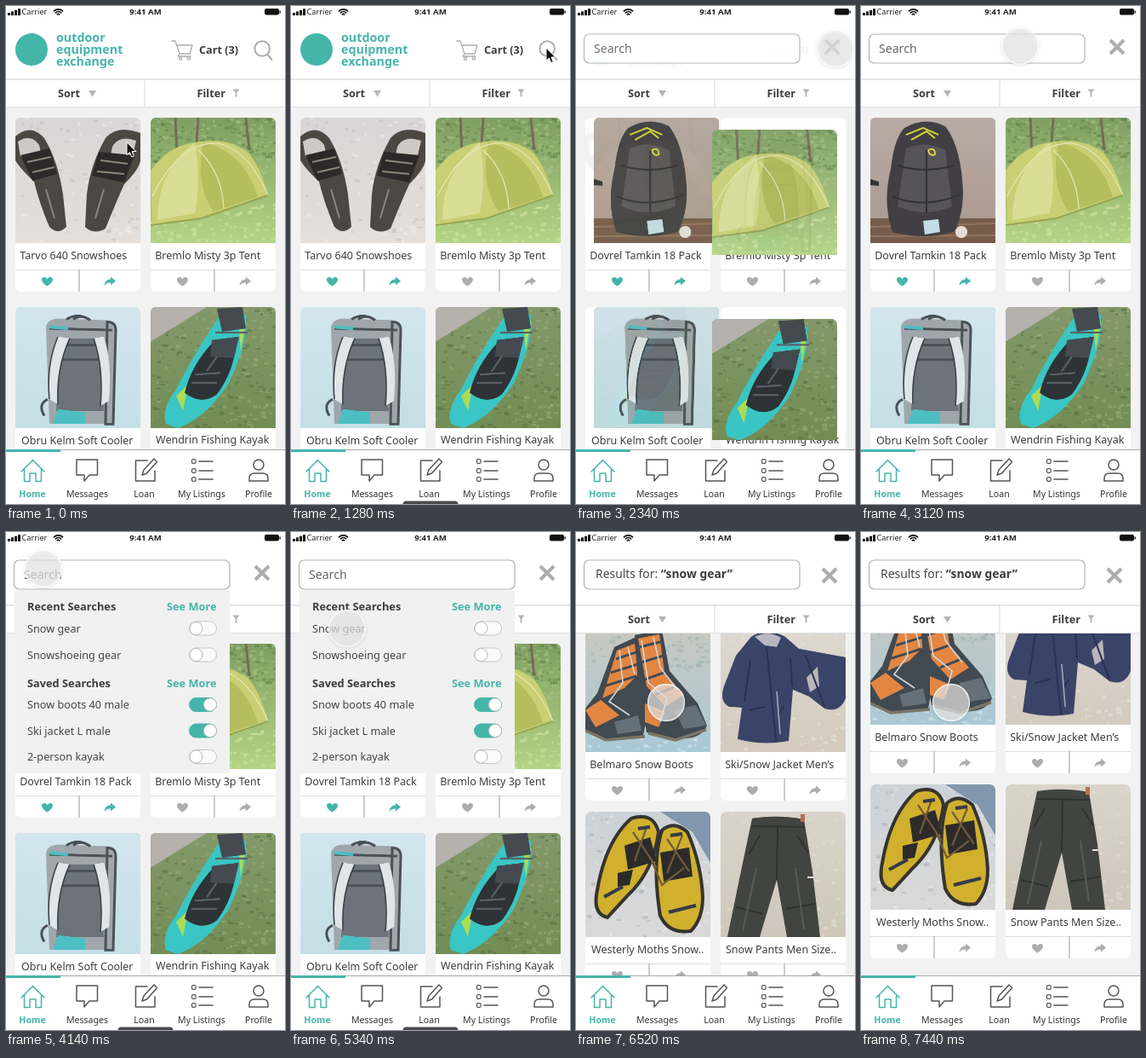
Write an HTML page with a canvas that moves like this. It is 328x584 px and loops after 7460 ms.

```html
<!DOCTYPE html>
<html lang="en">
<head>
<meta charset="utf-8">
<title>Gear exchange app</title>
<style>
html, body { margin: 0; width: 100%; height: 100%; overflow: hidden; background: #fff; }
canvas { display: block; width: 328px; height: 584px; }
</style>
</head>
<body>
<canvas id="stage"></canvas>
<script>
const LOOP = 7460, W = 328, H = 584, SIZE = 147;
const TEAL = '#45b5aa', INK = '#3c3c3c', GRAY = '#adadad', PAGE = '#f2f2f2';
const stage = document.getElementById('stage');
const dpr = Math.max(1, window.devicePixelRatio || 1);
stage.width = W * dpr;
stage.height = H * dpr;
const g = stage.getContext('2d');

// Photos: sky and ground tones, then [colour, path, stroke width] or [colour, speck count, top, bottom]
const PHOTOS = {
  shoes: ['#d9d6d8', '#e6dfd9',
    ['#f3f1f1', 60, 0, 147], ['#c3bdbd', 50, 0, 147],
    ['#4d4743', 'M0 22Q18 6 34 24Q50 50 56 90L60 128Q50 138 40 128Q28 100 22 75Q6 60 0 50Z'],
    ['#4d4743', 'M147 18Q120 8 106 24Q88 55 84 90L82 128Q92 138 106 130Q118 100 128 78Q146 60 147 50Z'],
    ['#cfc9c6', 'M3 28Q18 18 28 32L30 41L6 46ZM142 27Q122 20 114 34L112 44L138 44Z'],
    ['#2b2929', 'M6 44L40 36L49 66L20 74ZM98 40L140 44L128 76L90 68Z'],
    ['#8d857c', 'M14 52L42 46M20 64L46 58M100 50L132 54M96 63L128 66M36 84L46 118M104 84L94 118', 2]],
  tent: ['#7f9f62', '#b4d585',
    ['#a6c184', 150, 0, 70], ['#5f8048', 110, 0, 60], ['#cfe6a2', 110, 95, 147],
    ['#776b55', 'M29 0L31 40M56 0L54 30M112 0L116 38', 3],
    ['#c9cf72', 'M0 62Q22 32 52 29Q92 22 116 42Q130 60 138 91L60 118L2 126Z'],
    ['#dadd96', 'M52 29Q60 70 52 112L8 120Q8 62 52 29Z'],
    ['#b5bd5c', 'M62 29Q110 40 126 93L74 110Q52 78 62 29Z'],
    ['#e6e6b3', 'M2 92Q34 28 78 30Q114 36 138 91M56 38Q84 64 86 107', 1.3],
    ['#97a653', 'M0 126L60 118L138 91', 2]],
  cooler: ['#d3e6ee', '#c5dfe7',
    ['#9fa7ac', 'M36 24Q38 14 52 14L108 16Q118 18 118 28L115 142L40 142Z'],
    ['#4a5157', 'M108 18Q118 18 118 28L115 142L106 142ZM60 15Q74 6 88 16', 3],
    ['#6c737a', 'M52 38L100 38L104 126L48 126Z'],
    ['#4a5157', 'M40 26L114 28M52 46L100 46M56 64L98 64M38 112Q26 118 34 132M68 15Q78 8 88 16', 3],
    ['#dfe5e8', 'M50 36Q36 70 40 112L50 118Q48 74 64 38ZM92 38Q104 74 100 120L110 114Q114 66 104 36Z'],
    ['#39434a', 'M50 36Q36 70 40 112M64 38Q48 74 50 118M92 38Q104 74 100 120', 1.6],
    ['#4cbfc2', 'M50 124L82 128L82 142L44 142ZM40 22L62 24L62 28L40 26Z']],
  kayak: ['#84996a', '#738d55',
    ['#9cb07c', 130, 0, 147], ['#587242', 130, 0, 147],
    ['#b5b1ad', 'M0 0L66 0L0 42Z'],
    ['#39c6c4', 'M18 142Q12 124 30 100Q50 58 82 10Q96 -4 112 10Q116 40 92 92Q66 134 32 147Z'],
    ['#aedb55', 'M30 108L44 94L38 126ZM104 28L112 16L106 54Z'],
    ['#2e3338', 'M40 104Q48 70 74 42L100 46Q98 78 78 106Q60 120 40 104Z'],
    ['#444a50', 'M78 2L108 0L112 26L84 30ZM72 40L104 36L98 62L70 60Z'],
    ['#596068', 'M52 82L82 80M48 92L78 92M78 60L66 78M76 31L114 31', 2.2]],
  pack: ['#b9aba5', '#aa988e',
    ['#775c4b', 'M0 118L147 118L147 147L0 147Z'], ['#937461', 'M0 128L147 124M0 139L147 138', 2],
    ['#413f43', 'M40 12Q64 -2 88 10Q104 30 108 72Q112 110 98 134Q62 144 26 134Q14 100 24 60Q28 24 40 12Z'],
    ['#56545a', 'M42 36Q66 26 88 38L96 104Q64 118 32 104Z'],
    ['#303035', 'M32 56Q64 66 98 56M26 92Q62 108 106 90M66 38L66 112', 2],
    ['#d5d33e', 'M42 20L62 12L80 20M48 26L66 16L76 24M68 38Q76 34 76 43Q70 46 68 38', 2],
    ['#c4dde5', 'M62 121L80 119L82 134L64 137Z'], ['#e5ddd7', 'M100 134a7 7 0 1 1 14 0a7 7 0 1 1-14 0Z'],
    ['#333', 'M0 72L10 75L10 80L0 79Z']],
  boots: ['#c9c8c0', '#a9c9d6',
    ['#9bb4b1', 90, 0, 50], ['#d8e6eb', 70, 100, 147],
    ['#414951', 'M34 24L60 12L66 60L74 96L68 128L22 132L0 121L0 96L14 78Z'],
    ['#e38642', 'M37 28L58 20L62 56L46 72L20 84ZM0 98L18 86L40 104L12 118Z'],
    ['#414951', 'M58 10L90 4L99 52L132 90L143 116Q136 134 104 131L72 124L62 70Z'],
    ['#e38642', 'M62 14L87 9L93 54L116 80L94 94L72 70ZM70 90L94 100L86 118L70 112Z'],
    ['#667078', 'M104 98L130 92L142 116L116 120ZM34 112L62 104L66 122L38 126Z'],
    ['#414951', 'M36 38L60 30M30 54L62 44M22 70L60 58M64 24L88 18M66 42L92 34M70 62L98 52M82 80L112 68', 3],
    ['#cfd5d6', 'M40 28L44 66L28 88L52 104M66 16L74 66L96 84L88 112M50 24L58 56M80 12L88 48L108 74', 1.7],
    ['#7a7667', 'M0 122L24 133L70 129M74 125L106 133L142 121', 3.5]],
  jacket: ['#dfd9d1', '#d4cabe',
    ['#eae5de', 70, 0, 147],
    ['#3a4468', 'M36 12Q54 0 76 12L92 26L147 36L147 84Q140 102 122 96L104 82L85 74L80 134Q50 140 20 132L25 95L10 94Q-2 88 4 70L18 34Z'],
    ['#b7b7bf', 'M40 12Q56 4 71 13L66 24L52 22Z'], ['#b9b5b8', 'M101 60L114 47L116 70L105 77Z'],
    ['#2a3252', 'M54 24L65 134M28 88L35 40M84 70L82 36M34 98L52 94M74 94L68 104M100 34L122 94', 2],
    ['#a3a7b5', 'M66 76L70 126', 1.6]],
  yellow: ['#cdd2d7', '#dad9d8',
    ['#eceff1', 100, 0, 147], ['#a9b1ba', 70, 0, 147], ['#8097ad', 'M88 0L147 0L147 60L126 24Z'],
    ['#d0b02d', 'M54 8Q80 0 86 24Q80 70 50 98L26 124Q8 120 14 92Q24 34 54 8ZM90 22Q104 10 120 24Q136 60 138 100Q138 126 124 140Q98 144 88 122Q78 60 90 22Z'],
    ['#35342f', 'M54 8Q80 0 86 24Q80 70 50 98L26 124Q8 120 14 92Q24 34 54 8ZM90 22Q104 10 120 24Q136 60 138 100Q138 126 124 140Q98 144 88 122Q78 60 90 22Z', 4],
    ['#2c2b2a', 'M46 40L76 30L84 58L50 68ZM88 48L122 42L126 76L92 82ZM38 72L56 68L52 86L38 88Z'],
    ['#715a39', 'M56 24L84 66M72 18L58 58M96 32L122 70M114 28L96 72M78 58L90 86L116 66', 2.2],
    ['#343b49', 'M22 100L44 88M98 118L130 110M62 20L76 18M100 28L114 26', 4]],
  pants: ['#dad4ca', '#cfc7bb',
    ['#e6e0d8', 70, 0, 147],
    ['#42443f', 'M37 8Q68 3 98 9L108 70L117 147L78 147L66 80L46 147L8 147L26 60Z'],
    ['#2d302c', 'M37 17L99 18M67 18L66 80M33 50L46 28M103 48L90 28M18 112L50 120M76 114L112 108', 1.8],
    ['#585b56', 'M42 66L26 140M88 66L98 138', 2], ['#e4e4e4', 'M102 76h7v2h-7Z'],
    ['#b66f55', 'M94 3h5v9h-5Z']]
};

function paintPhoto([top, bottom, ...parts]) {
  const c = document.createElement('canvas');
  c.width = c.height = SIZE * 2;
  const p = c.getContext('2d');
  p.scale(2, 2);
  p.beginPath();
  p.roundRect(0, 0, SIZE, SIZE, [6, 6, 0, 0]);
  p.clip();
  const sky = p.createLinearGradient(0, 0, 0, SIZE);
  sky.addColorStop(0, top);
  sky.addColorStop(1, bottom);
  p.fillStyle = sky;
  p.fillRect(0, 0, SIZE, SIZE);
  let seed = 7;
  const rand = () => (seed = seed * 16807 % 2147483647) / 2147483647;
  for (const [color, what, a, b] of parts) {
    p.fillStyle = p.strokeStyle = color;
    if (typeof what === 'number') {
      p.globalAlpha = .55;
      for (let i = 0; i < what; i++) p.fillRect(rand() * SIZE, a + rand() * (b - a), 2 + rand() * 4, 1 + rand() * 3);
      p.globalAlpha = 1;
    } else if (a) {
      p.lineWidth = a;
      p.stroke(new Path2D(what));
    } else p.fill(new Path2D(what));
  }
  return c;
}
const photo = {};
for (const k in PHOTOS) photo[k] = paintPhoto(PHOTOS[k]);

const HOME = ['Tarvo 640 Snowshoes', 'Bremlo Misty 3p Tent', 'Obru Kelm Soft Cooler', 'Wendrin Fishing Kayak'];
const SEARCH = ['Dovrel Tamkin 18 Pack', ...HOME.slice(1)];
const RESULTS = ['Belmaro Snow Boots', 'Ski/Snow Jacket Men’s', 'Westerly Moths Snow..', 'Snow Pants Men Size..'];

// Helpers
const clamp = x => Math.max(0, Math.min(1, x));
const mix = (a, b, p) => a + (b - a) * p;
const span = (t, a, b) => clamp((t - a) / (b - a));
const easeOut = u => 1 - (1 - u) * (1 - u);
const smooth = u => u * u * (3 - 2 * u);
function track(t, keys, ease = smooth) {
  let i = 0;
  while (i < keys.length - 2 && t >= keys[i + 1][0]) i++;
  const [a, ...from] = keys[i], [b, ...to] = keys[i + 1];
  const p = ease(span(t, a, b));
  return from.map((v, k) => mix(v, to[k], p));
}
function layer(alpha, draw, x = 0, y = 0) {
  if (alpha <= 0) return;
  g.save();
  g.globalAlpha *= alpha;
  g.translate(x, y);
  draw();
  g.restore();
}
function text(s, x, y, size, color = INK, weight = 400, align = 'left') {
  g.font = `${weight} ${size}px "Noto Sans", sans-serif`;
  g.fillStyle = color;
  g.textAlign = align;
  g.fillText(s, x, y);
}
function rect(x, y, w, h, color) { g.fillStyle = color; g.fillRect(x, y, w, h); }
function round(x, y, w, h, r, fill, stroke, lw = 1) {
  g.beginPath();
  g.roundRect(x, y, w, h, r);
  if (fill) { g.fillStyle = fill; g.fill(); }
  if (stroke) { g.strokeStyle = stroke; g.lineWidth = lw; g.stroke(); }
}
function line(d, color, lw = 1) {
  g.strokeStyle = color;
  g.lineWidth = lw;
  g.stroke(new Path2D(d));
}
function fill(d, color) { g.fillStyle = color; g.fill(new Path2D(d)); }

const HEART = 'M0 5.5C-9 0-7-5-3.5-5C-1.5-5 0-3.5 0-2.5C0-3.5 1.5-5 3.5-5C7-5 9 0 0 5.5Z';
const SHARE = 'M1-5.5L7-.5L1 4.5V1.6Q-4 1.4-6.5 5Q-6-2.4 1-2.8Z';

const slot = (i, row2 = 353) => [i % 2 ? 170 : 11, [131, row2, 575][i >> 1]];

function cards(names, row2, liked) {
  names.forEach((name, i) => {
    const [x, y] = slot(i, row2), low = i > 1;
    const end = low ? 552 : 335, color = liked && i % 2 === 0 ? TEAL : GRAY;
    round(x, y, SIZE, end - y, 6, '#fff');
    text(name, x + (low ? (i === 2 ? 7 : 6) : 5.2), low ? (liked && i === 3 ? 513 : 514) : 297, 12.5);
    rect(x, end - 26, SIZE, 1, '#dedede');
    rect(x + 74.5, end - 26, 1, 26, '#9a9a9a');
    layer(1, () => fill(HEART, color), x + 37.5, end - 12);
    layer(1, () => fill(SHARE, color), x + 111, end - 12);
  });
}

function picture(name, x, y, h = SIZE, alpha = 1) {
  layer(alpha, () => g.drawImage(photo[name], x, y, SIZE, h));
}

function homePhotos(p) {
  const moves = [['tent', 'pack', 1, 0], ['cooler', 'tent', 2, 1], ['kayak', 'cooler', 3, 2], ['kayak', 'kayak', 4, 3]];
  if (p < 1) picture('shoes', 11, 131, SIZE, 1 - p);
  for (const [from, to, a, b] of moves) {
    const [ax, ay] = slot(a), [bx, by] = slot(b);
    const x = mix(ax, bx, p), y = mix(ay, by, p), h = mix(a > 1 ? 142 : SIZE, b > 1 ? 142 : SIZE, p);
    picture(from, x, y, h);
    if (p > 0) picture(to, x, y, h, p);
  }
}

// Each window travels and turns; the photos inside it slide with their screens.
function resultPhotos(p, pushed, incoming) {
  const moves = [['pack', 'boots', 0, 0, 0], ['tent', 'yellow', 1, 2, 0], ['cooler', 'jacket', 2, 1, -90], ['kayak', 'pants', 3, 3, -90]];
  for (const [from, to, a, b, turn] of moves) {
    const [ax, ay] = slot(a), [bx, by] = slot(b, 348);
    const x = mix(ax, bx, p), y = mix(ay, by, p), h = mix(a > 1 ? 142 : SIZE, SIZE, p);
    const angle = turn * (1 - p) * Math.PI / 180;
    layer(1, () => {
      g.rotate(angle);
      g.beginPath();
      g.roundRect(-SIZE / 2, -h / 2, SIZE, h, [6, 6, 0, 0]);
      g.clip();
      g.rotate(-angle);
      picture(from, pushed - SIZE / 2, -h / 2, h, 1 - p * p);
      picture(to, incoming - SIZE / 2, -h / 2, h);
    }, x + SIZE / 2, y + h / 2);
  }
}

function statusBar() {
  for (let i = 0; i < 4; i++) rect(2 + i * 4, 8 - i * 1.6, 3, 3 + i * 1.6, '#111');
  text('Carrier', 18.5, 10, 9.2, '#222');
  for (const r of [1.6, 4.4, 7.2]) {
    g.beginPath();
    g.arc(61.5, 11, r, -2.35, -.79);
    g.strokeStyle = '#111';
    g.lineWidth = 1.7;
    g.stroke();
  }
  text('9:41 AM', 164, 10, 9.6, '#222', 600, 'center');
  round(304, 3, 17, 7.5, 2, '#111');
  rect(321.5, 5.5, 1.3, 3, '#111');
}

function brandHeader() {
  g.beginPath();
  g.arc(30, 51, 19, 0, 7);
  g.fillStyle = TEAL;
  g.fill();
  ['outdoor', 'equipment', 'exchange'].forEach((s, i) => text(s, 59, 41.5 + i * 14.3, 14.3, TEAL, 700));
  line('M195 41h4l5 15h12l3-10h-18M204 56l-2 3h15', GRAY, 1.3);
  for (const x of [205, 215]) { g.beginPath(); g.arc(x, 61.5, 1.6, 0, 7); g.stroke(); }
  text('Cart (3)', 227, 56, 12.7, INK, 700);
  g.lineCap = 'round';
  line('M310 50a8.8 8.8 0 1 1-17.6 0a8.8 8.8 0 1 1 17.6 0M307.5 57l5 6', GRAY, 2);
}

function filterRow() {
  rect(0, 85.5, W, 33, '#fff');
  rect(0, 85.5, W, 1, '#cfcfcf');
  rect(0, 118, W, 1, '#e2e2e2');
  rect(162.5, 86, 1, 32, '#d8d8d8');
  text('Sort', 61, 107, 12.7, INK, 700);
  fill('M97 99h9l-4.5 7.5Z', '#b5b5b5');
  text('Filter', 224.5, 107, 12.7, INK, 700);
  fill('M266.5 97.5h8l-3 4v5.5l-2-1v-4.5Z', '#b5b5b5');
}

function cross(x, y) {
  layer(1, () => { g.lineCap = 'butt'; line('M-8-8L8 8M8-8L-8 8', GRAY, 4); }, x, y);
}

function resultLabel() {
  text('Results for: ', 23, 54, 13.9, '#444');
  const w = g.measureText('Results for: ').width;
  text('“snow gear”', 23 + w, 54, 13.9, INK, 700);
}

function toggle(y, on) {
  round(215.5, y - 8, 32, 16, 8, on ? TEAL : '#fbfbfb', on ? TEAL : '#c4c4c4');
  g.beginPath();
  g.arc(on ? 240 : 223.5, y, 7.6, 0, 7);
  g.fillStyle = '#fff';
  g.fill();
  g.strokeStyle = '#b9b9b9';
  g.stroke();
}

function menuItems() {
  for (const [s, y] of [['Recent Searches', 92], ['Saved Searches', 181.5]]) {
    text(s, 25, y, 12.8, INK, 700);
    text('See More', 189, y, 12.8, TEAL, 700);
  }
  const rows = [['Snow gear', 113, 0], ['Snowshoeing gear', 144, 0], ['Snow boots 40 male', 202.5, 1], ['Ski jacket L male', 233, 1], ['2-person kayak', 263.5, 0]];
  for (const [s, y, on] of rows) {
    text(s, 25, y + 4.5, 12.7, '#444');
    toggle(y, on);
  }
}

function navBar(indicator) {
  rect(0, 520, W, 64, '#fff');
  rect(0, 520, W, 1, '#a8a8a8');
  rect(0, 520, 64, 3, TEAL);
  g.lineJoin = g.lineCap = 'round';
  line('M18 546L31.5 532.5L45 546M21.5 543V557.5H28V548H35V557.5H41.5V543', TEAL, 1.5);
  line('M83 532h24.5v18h-9.5l-6 7v-7h-9Z', '#555', 1.5);
  line('M166 533h-13.5v24h22.5v-12M160 550l2-6L174 531l3.5 3.5L165.5 548Z', '#555', 1.5);
  line('M227 534h16M227 545h16M227 555h16', '#555', 1.6);
  for (const y of [534, 545, 555]) round(218.5, y - 2.3, 4.6, 4.6, 1.4, null, '#555', 1.2);
  line('M303 538a6 6 0 1 1-12 0a6 6 0 1 1 12 0M286 557v-3q0-6 6-6h10q6 0 6 6v3Z', '#555', 1.5);
  text('Home', 31, 575.5, 10.6, TEAL, 700, 'center');
  [['Messages', 95.5], ['Loan', 162.5], ['My Listings', 230], ['Profile', 297]].forEach(([s, x]) => text(s, x, 575.5, 10.6, '#333', 400, 'center'));
  if (indicator) round(131.5, 580.5, 65, 8, 4, '#4a4a4a');
}

function pointer(t) {
  if (t < 1720) {
    const [x, y] = track(t, [[250, 142, 160], [1150, 300, 49.5]]);
    layer(1, () => {
      const arrow = 'M0 0V14.5L3.4 11.5L5.8 17L8.4 15.9L6 10.5H10.5Z';
      fill(arrow, '#111');
      g.lineJoin = 'round';
      line(arrow, '#fff', 1);
    }, x, y);
    return;
  }
  const [x, y] = track(t, [[2700, 305, 50], [3600, 44, 43], [4400, 44, 43], [5000, 66, 113], [5980, 66, 113], [6360, 106, 200], [LOOP, 106, 200]]);
  layer(span(t, 1720, 1820), () => {
    g.beginPath();
    g.arc(0, 0, 21.5, 0, 7);
    g.shadowColor = 'rgba(0,0,0,.22)';
    g.shadowBlur = 4 * dpr;
    g.shadowOffsetY = dpr;
    g.fillStyle = 'rgba(240,240,240,.68)';
    g.fill();
    g.shadowColor = 'transparent';
    g.strokeStyle = 'rgba(255,255,255,.85)';
    g.lineWidth = 1.3;
    g.stroke();
  }, x, y);
}

function draw(t) {
  const p1 = easeOut(span(t, 1894, 2494));
  const p2 = easeOut(span(t, 5555, 6155));
  const menu = smooth(span(t, 3780, 4040));
  const [scroll] = track(t, [[6380, 0], [6520, 20], [6820, 52]], u => u);
  const pushed = -82 * p2, incoming = W * (1 - p2), stay = 1 - p2 ** 4;

  g.setTransform(dpr, 0, 0, dpr, 0, 0);
  rect(0, 0, W, H, '#fff');
  g.save();
  g.beginPath();
  g.rect(0, 119, W, 401);
  g.clip();
  rect(0, 119, W, 401, PAGE);
  layer(stay, () => cards(p1 > .5 ? SEARCH : HOME, 353, true), pushed);
  if (p2 > 0) {
    layer(1, () => {
      rect(0, 0, W, 720, PAGE);
      cards(RESULTS, 348, false);
    }, incoming, -scroll);
    layer(1, () => resultPhotos(p2, pushed, incoming), 0, -scroll);
  } else homePhotos(p1);
  g.restore();

  filterRow();
  layer(1 - p1, brandHeader);
  layer(p1, () => {
    round(9.5, 33, 253.5, 34, 6, '#fff', '#b2b2b2', 1.2);
    cross(mix(301, 298, p2), mix(48, 51, p2));
    layer(stay, () => text('Search', 21, 55, 14.1, '#666'), pushed);
    if (p2 > 0) layer(1, resultLabel, incoming);
  });
  layer(menu * (1 - p2 ** 3), () => rect(9.5, 68, 253.5, 215, '#f1f1f1'), pushed);
  layer(menu * stay, menuItems, pushed);

  statusBar();
  navBar((t > 1150 && t < 1894) || (t > 3900 && t < 5555));
  pointer(t);
}

function tick() {
  draw(performance.now() % LOOP);
  requestAnimationFrame(tick);
}
tick();
</script>
</body>
</html>
```
